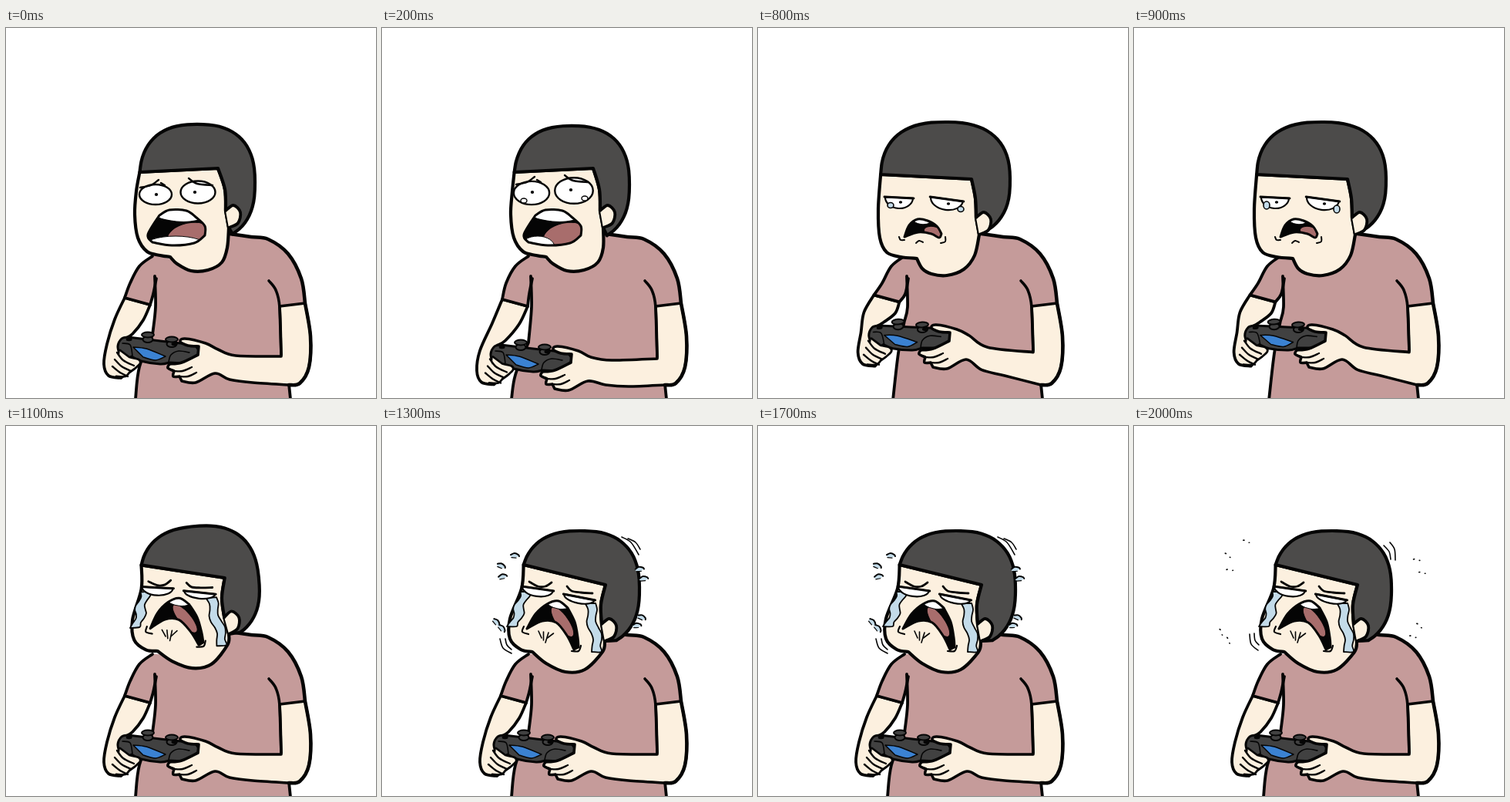
An HTML page for the animation above (2.1 s loop, 480 by 480 pixels).

```html
<!DOCTYPE html>
<html lang="en">
<head>
<meta charset="utf-8">
<title>Crying gamer</title>
<style>
html, body { margin: 0; width: 100%; height: 100%; overflow: hidden; background: #fff; }
svg { display: block; width: 100%; height: 100%; }
</style>
</head>
<body>
<svg id="stage" viewBox="0 0 480 480" fill="none" stroke-linecap="round" stroke-linejoin="round"></svg>
<script>
const LOOP = 2100, STEP = 100;
const INK = '#050505', SKIN = '#fcf0df', SHIRT = '#c59b9a', HAIR = '#4c4b4a';
const PAD = '#414141', BLUE = '#3b82d2', TEAR = '#c3dbe9', TONGUE = '#a86d6c', WHITE = '#fff';
const stage = document.getElementById('stage');

function add(parent, tag, attrs = {}) {
  const el = document.createElementNS(stage.namespaceURI, tag);
  for (const k in attrs) el.setAttribute(k, attrs[k]);
  parent.appendChild(el);
  return el;
}
const group = (parent, transform = '') => add(parent, 'g', { transform });
const range = n => [...Array(n).keys()];

// Smooth curve through points; "/" marks a sharp corner.
function curve(text) {
  let d = '', last = null;
  for (const part of text.split('/')) {
    const pts = part.trim().split(/\s+/).map(p => p.split(',').map(Number));
    if (last) pts.unshift(last); else d = 'M' + pts[0];
    for (let i = 0; i < pts.length - 1; i++) {
      const a = pts[i - 1] || pts[i], b = pts[i], c = pts[i + 1], e = pts[i + 2] || c;
      const h1 = [0, 1].map(k => b[k] + (c[k] - a[k]) / 6);
      const h2 = [0, 1].map(k => c[k] - (e[k] - b[k]) / 6);
      d += `C${h1} ${h2} ${c}`;
    }
    last = pts[pts.length - 1];
  }
  return d;
}
const shift = (text, dx, dy) =>
  text.replace(/([\d.]+),([\d.]+)/g, (m, x, y) => `${+x + dx},${+y + dy}`);

const ink = width => ({ stroke: width ? INK : 'none', 'stroke-width': width });
const shape = (g, text, fill, width = 0) =>
  add(g, 'path', { d: curve(text) + 'Z', fill, ...ink(width) });
const line = (g, text, width = 2.4) =>
  text.split('|').forEach(t => add(g, 'path', { d: curve(t), ...ink(width) }));
const oval = (g, cx, cy, rx, ry, fill, width = 0, turn = 0) =>
  add(g, 'ellipse', { cx, cy, rx, ry, fill, ...ink(width), transform: `rotate(${turn} ${cx} ${cy})` });

// ---- body ----
const RIGHT_HAND = '271,448 246,460 228,458/225,452/217,452 218,445/210,441 212,436/' +
  '228,434 249,424/250,413/236,412 226,407 232,403 259,409';
const LEFT_FINGERS = '148,418 160,427/172,430 174,435 167,442/160,447/155,452 143,452';

function controller(g) {
  shape(g, '158,401/150,403 145,413 148,426/155,430 163,426/175,432 200,436 212,434/' +
    '235,435 247,431 250,418/245,411/200,406 158,401', PAD, 3);
  line(g, '151,409 161,411 164,425|211,433 214,424 224,419 238,421', 1.6);
  shape(g, '165,414/182,416 207,426/194,431 178,427/165,414', BLUE, 1.5);
  for (const [x, y] of [[184, 398], [215, 404]]) {
    oval(g, x, y + 6, 6.5, 4, PAD, 2);
    oval(g, x, y, 8, 3.4, PAD, 2);
    oval(g, x * 1.9 - 190, y + 6, 4, 2.2, INK);
  }
}

// Everything below the sleeves follows the hands, which move by dx, dy.
function body(dx, dy, tilt) {
  const g = group(stage);
  const lift = Math.max(0, -dy), k = dy * 0.2;
  const cuffL = `${154 + k},${350 + k}`, cuffR = `${187 + k},${359 + k}`;
  const handY = dy * 0.85;
  const outer = `${cuffL}/${141 + k},${378 + dy / 2} ` + shift('131,410 127,436 133,451 149,454', dx + lift / 5, handY);
  const inner = shift('165,440/148,414 154,403/164,397', dx, handY) + ` 178,${379 + dy / 2} ${cuffR}`;
  const sleeve = `190,296 173,309 161,331 ${cuffL}/${cuffR}`;
  const side = `193,322 194,362 190,${398 + dy}/${173 + lift / 2},${440 + dy} ${168 + lift * 0.4},481`;
  const shoulder = '290,267/318,271 340,274 366,293 383,325 388,357';
  const elbow = '388,357/395,400 393,440 381,461 367,463';

  shape(g, `${outer}/${inner}/${cuffL}`, SKIN, 3.8);
  shape(g, `${side}/369,481/367,463/357,425 355,361/388,357/383,325 366,293 340,274 318,271/290,267/240,300 190,297`, SHIRT);
  shape(g, `215,300/${sleeve}/191,343 193,322`, SHIRT);
  line(g, `${sleeve}|${side}|367,462 369,481|${cuffR} 191,345 195,325`, 3.8);

  const pad = group(g, `translate(${dx} ${dy}) rotate(${tilt} 200 418)`);
  controller(pad);

  const under = `320,${460 + dy / 2} 290,${456 + dy * 0.7}`;
  const over = `${275 + dx},${417 + dy} 298,${425 + dy * 0.6} 357,${426 + dy * 0.3}`;
  shape(g, `355,361/${elbow}/${under} ${shift(RIGHT_HAND, dx, dy)} ${over}/355,361`, SKIN, 3.6);
  line(g, shift('218,445 229,445 241,440|225,452 236,452 247,447', dx, dy));
  line(g, `341,328 350,340 355,362 357,${424 + dy * 0.3}`, 3.6);
  line(g, `${shoulder}/${elbow}`, 4.6);

  const hand = group(g, `translate(${dx} ${handY})`);
  shape(hand, LEFT_FINGERS, SKIN);
  line(hand, LEFT_FINGERS, 2.8);
  for (const i of range(3))
    line(hand, `${144 - 3 * i},${421 + 9 * i} ${152 - 2 * i},${431 + 8 * i} ${166 - 4 * i},${438 + 7 * i}`);
  return g;
}

// ---- head parts ----
// Hair is an arc of a superellipse, from the hairline over the crown to the nape.
function hairArc({ cx, cy, rx, hairY }) {
  const ry = 76, power = 2.5;
  const bend = v => Math.sign(v) * Math.abs(v) ** (2 / power);
  const from = Math.PI + Math.asin(((cy - hairY) / ry) ** (power / 2)), to = 2 * Math.PI + 1;
  return range(25).map(i => {
    const a = from + (to - from) * i / 24;
    return `${cx + rx * bend(Math.cos(a))},${cy + ry * bend(Math.sin(a))}`;
  }).join(' ');
}

function headBase(o) {
  const g = group(stage);
  const arc = hairArc(o), left = arc.split(' ')[0];
  const [rx, ry] = o.corner, [ex, ey] = o.ear;
  const front = `${ex},${ey}/${ex - 1},${(ry + ey) / 2} ${rx},${ry}/${left}`;
  const ear = `${ex},${ey} ${ex + 10},${ey - 7} ${ex + 19},${ey + 2} ${ex + 16},${ey + 16} ${ex + 4},${ey + 22}`;
  shape(g, `${left}/${o.jaw} ${ex + 4},${ey + 22}/${front}`, SKIN, 4.2);
  shape(g, `${arc}/${ex + 4},${ey + 22}/${front}`, HAIR, 4.2);
  shape(g, ear, SKIN);
  line(g, ear, 3.8);
  return g;
}

let clips = 0;
// Teeth and tongue are ovals cut off by the lips: [cx, cy, rx, ry, colour, turn].
function mouth(g, lips, ...ovals) {
  const id = 'lips' + clips++, d = curve(lips) + 'Z';
  add(add(g, 'clipPath', { id }), 'path', { d });
  add(g, 'path', { d, fill: INK });
  const inside = add(g, 'g', { 'clip-path': `url(#${id})` });
  for (const [cx, cy, rx, ry, fill, turn] of ovals) oval(inside, cx, cy, rx, ry, fill, 1, turn);
  add(g, 'path', { d, ...ink(3) });
}

// Half-closed eye: a heavy lid with the white hanging below it.
function slit(g, x, y, w, h, turn) {
  const eye = group(g, `translate(${x} ${y}) rotate(${turn})`);
  add(eye, 'path', { d: `M${-w} 0A${w} ${h} 0 0 0 ${w} 0Z`, fill: WHITE, ...ink(2.2) });
  line(eye, `${-w - 1},0 ${w + 1},0`, 3);
  return eye;
}

// Wavy stream of tears from one point to another.
function stream(g, x1, y1, x2, y2) {
  const side = (w, phase) => range(9).map(i => {
    const f = i / 8, wave = 2.5 * Math.sin(f * 11 + phase);
    return `${x1 + (x2 - x1) * f + w + wave},${y1 + (y2 - y1) * f}`;
  });
  shape(g, side(-6.5, 0).join(' ') + '/' + side(5.5, 0.7).reverse().join(' '), TEAR, 1.8);
}

// ---- heads ----
function screamHead(panic) {
  const g = headBase({
    cx: 248 - panic * 2, cy: 201 + panic * 2, rx: 75, hairY: 187, corner: [275 - panic, 182], ear: [285 - panic * 2, 237],
    jaw: '169,212 167,242 171,272 183,290 200,295 213,297/222,306 240,315 262,314 280,304 287,285'
  });
  const grow = 1 + panic * 0.1;
  for (const [x, y, rx, ry, px] of [[194, 216, 21, 13, 195], [249, 213, 22.5, 14.5, 245]]) {
    oval(g, x, y - panic * 2, rx * grow, ry * (grow + panic * 0.06), WHITE, 2.4);
    oval(g, px, y - panic * 3, 2.2, 2, INK);
    if (panic) oval(g, x + (x > 220 ? 14 : -10), y + 8, 4, 3, WHITE, 1.4);
  }
  const brows = group(g, `translate(0 ${panic * -4})`);
  line(brows, '174,207 188,204 198,197|201,201 206,204|237,195 248,202 268,204');
  mouth(g, '199,243/212,236 234,237 247,246 258,257 258,269/244,279 215,282 190,278/184,268 199,243',
    [238, 269, 29, 16, TONGUE, -12], [222, 239, 36, 12, WHITE, 5], [220 - panic * 18, 284, 42 - panic * 20, 14, WHITE, 0]);
  return g;
}

function sobHead() {
  const g = headBase({
    cx: 243, cy: 198, rx: 84, hairY: 190, corner: [277, 196], ear: [283, 246],
    jaw: '156,235 158,272 167,291 185,297 206,299/213,312 225,319 245,321 267,313 281,295'
  });
  for (const [x, y, w, turn] of [[183, 220, 18, 3], [245, 222, 21, 8]]) {
    slit(g, x, y, w, 14, turn);
    oval(g, x + 2, y + 6, 2.2, 1.8, INK);
  }
  mouth(g, '190,271/196,256 207,248 220,250 232,257 238,267/235,272 225,267 208,265 190,271',
    [229, 265, 14, 7, TONGUE, 15], [212, 250, 11, 4.5, WHITE, 8]);
  line(g, '183,271 185,275 190,275|243,271 243,277 237,279|205,279 209,276 214,278', 2);
  return g;
}

function wailHead() {
  const g = headBase({
    cx: 257, cy: 212, rx: 77, hairY: 180, corner: [290, 206], ear: [285, 257],
    jaw: '181,211 166,250 166,276 180,290 195,293/213,308 238,319 263,316 286,293'
  });
  stream(g, 186, 215, 171, 260);
  stream(g, 270, 230, 281, 293);
  slit(g, 202, 211, 20, 10, 8);
  slit(g, 256, 222, 20, 8, 11);
  line(g, '191,202 202,208 212,208 220,203|240,208 246,214 258,216 273,217', 2.8);
  mouth(g, '188,263/199,244 214,231 229,227 241,236/250,254 254,274 255,287/249,290/240,272 226,255 208,253 188,263',
    [234, 254, 23, 8, TONGUE, 55], [229, 231, 15, 6, WHITE, 10]);
  line(g, '184,260 182,267 190,270|258,285 255,292 246,292', 2.2);
  for (const i of range(4))
    line(g, `${203 + 6.5 * i},${266 + i} ${207 + 2.5 * i},${275 + 3 * (i % 3)}`, 1.6);
  return g;
}

const bodies = { low: body(0, 0, 0), lower: body(-4, 10, 0), high: body(-1, -18, -4) };
const heads = { scream: screamHead(0), panic: screamHead(1), sob: sobHead(), wail: wailHead() };
const tears = [[172, 230], [263, 235]].map(([x, y]) => oval(heads.sob, x, y, 4, 5, TEAR, 1.6));

// ---- shaking marks and sweat ----
const shakes = [
  '311,144 323,151 333,167|319,146 329,151 335,160|153,276 157,288 168,295|160,276 162,284 168,290',
  '324,155 331,163 333,173|332,151 338,160 339,174|150,270 152,283 161,291|156,269 157,278 162,284'
].map(marks => {
  const g = group(stage);
  line(g, marks, 1.6);
  return g;
});

const SWEAT = [[162, 161], [142, 176], [144, 192], [135, 259], [143, 268], [346, 181], [352, 195], [349, 252], [342, 264]];
const REACH = [0.88, 0.94, 1, 1.2];
const sweat = REACH.map(reach => {
  const g = group(stage);
  SWEAT.forEach(([x, y], i) => {
    const turn = x < 245 && y > 220 ? 45 : 20 * Math.sin(i * 2);
    const d = group(g, `translate(${245 + (x - 245) * reach} ${220 + (y - 220) * reach}) rotate(${turn})`);
    if (reach > 1) {
      oval(d, -3, -1, 1.4, 0.9, INK);
      oval(d, 4, 2, 1.1, 0.8, INK);
    } else {
      oval(d, 0, 0, 5.5, 2.7, TEAR);
      line(d, '-5,-1 0,-3 5,-1 6,1', 2);
      line(d, '-4,2.5 2,3', 1.2);
    }
  });
  return g;
});

// ---- timeline ----
const show = (el, on) => el.setAttribute('visibility', on ? 'visible' : 'hidden');

function scene(t) {
  if (t < 800) return t % 400 < 200 ? ['low', 'scream'] : ['lower', 'panic'];
  return t < 1100 ? ['high', 'sob'] : ['low', 'wail'];
}

function draw(t) {
  const [pose, mood] = scene(t);
  for (const k in bodies) show(bodies[k], k === pose);
  for (const k in heads) show(heads[k], k === mood);

  const drop = Math.floor((t - 800) / STEP);
  tears.forEach(el => el.setAttribute('ry', Math.min(7, Math.max(0, 3.5 + 1.5 * drop))));

  // The head rolls back over the first steps of wailing.
  const step = Math.floor((t - 1300) / STEP);
  const roll = Math.max(0, Math.min(1, -step / 2));
  heads.wail.setAttribute('transform', `translate(${3 * roll} ${-5 * roll}) rotate(${-5 * roll} 240 310)`);

  shakes.forEach((g, i) => show(g, step >= 0 && step % 2 === i));
  sweat.forEach((g, i) => show(g, step >= 0 && step % 4 === i));
}

const start = performance.now();
function tick() {
  draw((performance.now() - start) % LOOP);
  requestAnimationFrame(tick);
}
tick();
</script>
</body>
</html>
```
